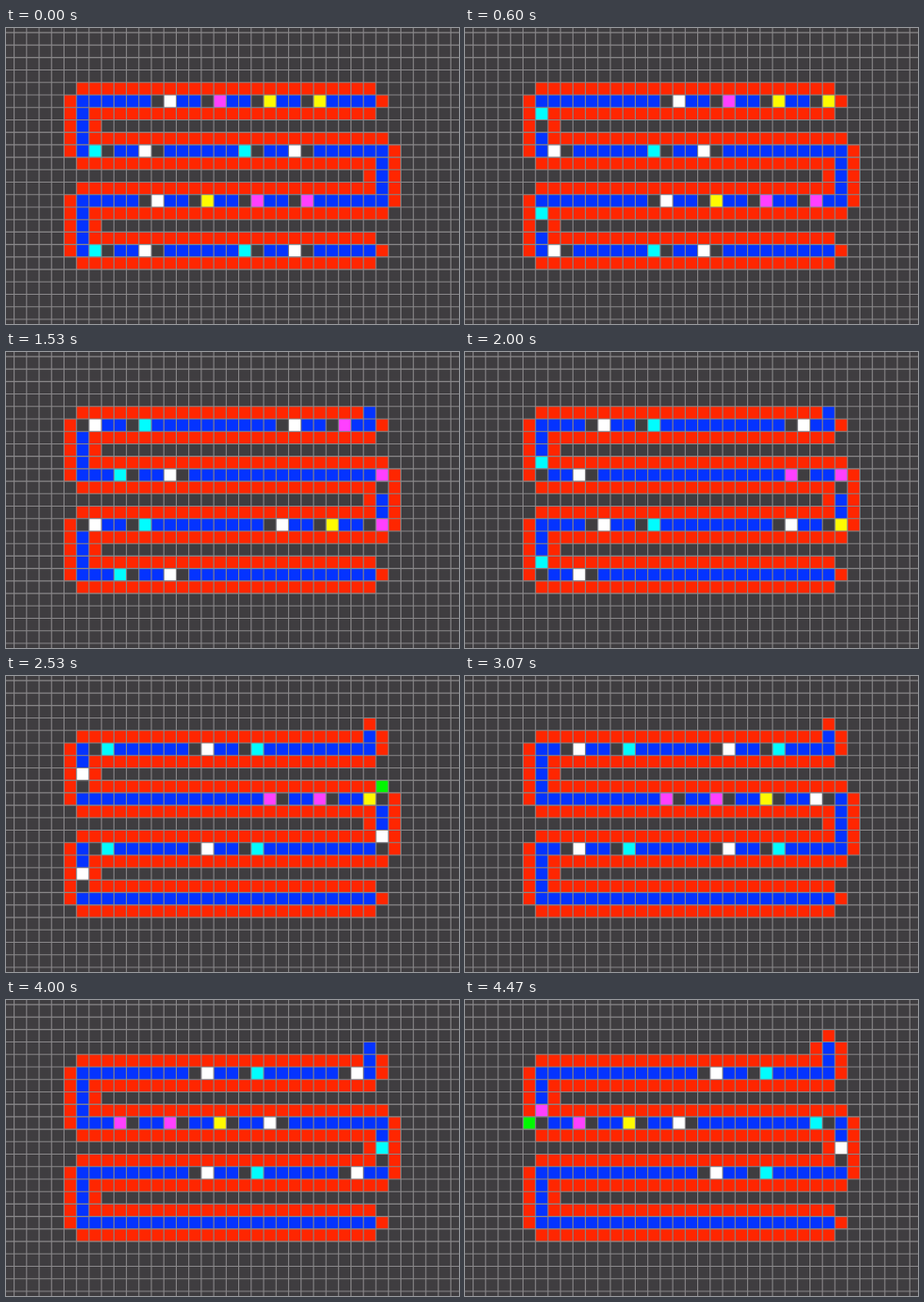
Recreate the animation shown at these times as an HTML page with a canvas. Size 480 px wide and 314 px high, loop 4.54 s.

```html
<!DOCTYPE html>
<html lang="en">
<head>
<meta charset="utf-8">
<title>Signals on a sheathed path</title>
<style>
html, body { margin: 0; width: 100%; height: 100%; overflow: hidden; background: #3f3d40; }
canvas { display: block; }
</style>
</head>
<body>
<canvas id="stage" width="480" height="314"></canvas>
<script>
const ctx = document.getElementById('stage').getContext('2d');
const PITCH = 13.22, LEFT = 74.7, TOP = 71, LOOP = 4540;
const EMPTY = '#3f3d40', GRID = '#888688';
const CORE = 1, SHEATH = 2, FLASH = 3;
const COLORS = [EMPTY, '#0433ff', '#ff2600', '#00f900', '#fffb00', '#ff40ff', '#ffffff', '#00fdff'];

// The path winds from the bottom right end up to the growing arm.
const path = [[23, 12]];
function run(col, row) {
  let [c, r] = path[path.length - 1];
  while (c !== col || r !== row) {
    c += Math.sign(col - c);
    r += Math.sign(row - r);
    path.push([c, r]);
  }
}
run(0, 12);
run(0, 8);
run(24, 8);
run(24, 4);
run(0, 4);
run(0, 0);
run(23, 0);
const TIP = path.length - 1;
run(23, -2);

// Commands on the tape: one signal every four cells, the first one leading.
const EXTEND = '76', TURN_LEFT = '4456', TURN_RIGHT = '5546';
const signals = [];
function send(head, command) {
  [...command].forEach((state, i) => signals.push({ start: head - 4 * i, state: +state }));
}
send(102, TURN_LEFT);
send(78, EXTEND);
send(66, EXTEND);
send(45, TURN_RIGHT);
send(22, EXTEND);
send(10, EXTEND);

// Each command first opens a new cell, then wraps it in sheath.
const opened = n => TIP + (n >= 9) + (n >= 30);
const wrapped = n => TIP + (n >= 18) + (n >= 35);

// The pace picks up after a slower start.
const pace = [[0, 0], [1530, 10.9], [3070, 24.3], [LOOP, 36]];

function generation(t) {
  const i = pace.findIndex(p => p[0] > t);
  const [t0, n0] = pace[i - 1], [t1, n1] = pace[i];
  return Math.floor(n0 + (n1 - n0) * (t - t0) / (t1 - t0));
}

function cell([c, r], state) {
  ctx.fillStyle = COLORS[state];
  ctx.fillRect(LEFT + c * PITCH, TOP + r * PITCH, PITCH, PITCH);
}

// State 4 lights the sheath ahead of a left turn, state 5 ahead of a right turn.
function flash(s, state) {
  if (s < 1 || s >= TIP) return;
  const [[c0, r0], [c, r], [c1, r1]] = path.slice(s - 1, s + 2);
  const turn = (c - c0) * (r1 - r) - (r - r0) * (c1 - c);
  if (turn && turn === 2 * state - 9) cell([2 * c - c0, 2 * r - r0], FLASH);
}

function grid() {
  ctx.strokeStyle = GRID;
  ctx.lineWidth = 1.1;
  ctx.beginPath();
  for (let x = LEFT % PITCH; x < 480; x += PITCH) {
    ctx.moveTo(x, 0);
    ctx.lineTo(x, 314);
  }
  for (let y = TOP % PITCH; y < 314; y += PITCH) {
    ctx.moveTo(0, y);
    ctx.lineTo(480, y);
  }
  ctx.stroke();
}

function draw(n) {
  const end = opened(n);
  ctx.fillStyle = EMPTY;
  ctx.fillRect(0, 0, 480, 314);

  for (const [c, r] of path.slice(0, wrapped(n) + 1)) {
    [[c - 1, r], [c + 1, r], [c, r - 1], [c, r + 1]].forEach(p => cell(p, SHEATH));
  }
  path.slice(0, end + 1).forEach(p => cell(p, CORE));

  for (const { start, state } of signals) {
    const s = start + n;
    if (s - 1 < end) cell(path[s - 1], 0);
    if (s <= opened(n - 1)) cell(path[s], state);
    if (n > 0) flash(s - 1, state);
  }
  grid();
}

function tick() {
  draw(generation(performance.now() % LOOP));
  requestAnimationFrame(tick);
}
tick();
</script>
</body>
</html>
```
